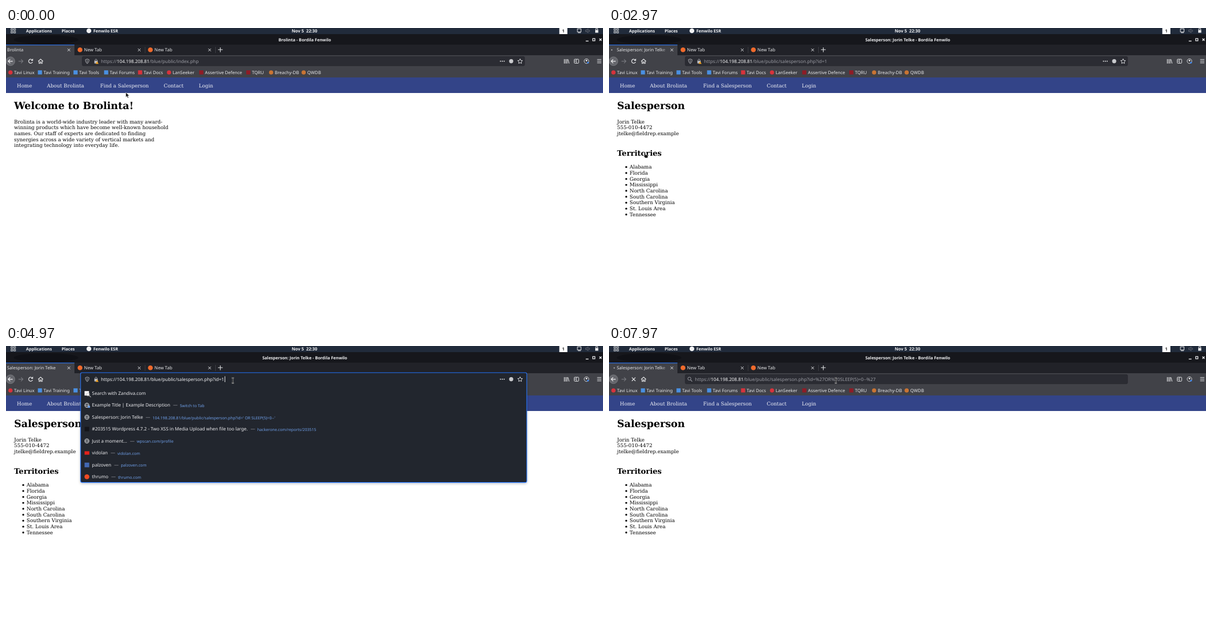
These frames come from a looping animation (1073 by 522 pixels, 8000 ms). An HTML page:

```html
<!DOCTYPE html>
<html lang="en">
<head>
<meta charset="utf-8">
<title>Browser session</title>
<style>
html, body { margin: 0; width: 100%; height: 100%; overflow: hidden; background: #fff; }
svg { display: block; }
text { text-rendering: geometricPrecision; }
.ui { font-family: "Noto Sans", sans-serif; }
.page { font-family: "DejaVu Serif", serif; font-size: 9px; }
</style>
</head>
<body>
<svg id="stage" width="1073" height="522" viewBox="0 0 1073 522"></svg>
<script>
const stage = document.getElementById('stage');
const LOOP = 8000;
const STEPS = [0, 970, 1970, 2970, 3970, 4970, 5970, 6970, 7970];

const REP = 'Jorin Telke';
const BROWSER = 'Bordila Fenwilo';
const HOST = '104.198.208.81';
const DIR = '/blue/public/';
const PERSON_URL = `https://${HOST}${DIR}salesperson.php?id=`;
const LIGHT = '#e9eaec', GREY = '#9b9ca3', BAR = '#414248', FIELD = '#2b2c33', ACCENT = '#2777ff';

// drawing helpers
const rect = (x, y, w, h, fill, more = '') =>
  `<rect x="${x}" y="${y}" width="${w}" height="${h}" fill="${fill}" ${more}/>`;
const dot = (x, y, r, fill, more = '') =>
  `<circle cx="${x}" cy="${y}" r="${r}" fill="${fill}" ${more}/>`;
const line = (d, color = LIGHT, width = 1) =>
  `<path d="${d}" fill="none" stroke="${color}" stroke-width="${width}"/>`;
const ui = (x, y, s, size = 8, fill = LIGHT, more = '') =>
  `<text class="ui" x="${x}" y="${y}" font-size="${size}" fill="${fill}" ${more}>${s}</text>`;
const serif = (x, y, s, more = '') => `<text class="page" x="${x}" y="${y}" ${more}>${s}</text>`;
const heading = (y, s, size) => serif(14.6, y, s, `style="font-size:${size}px" font-weight="700"`);
const lines = (x, y, list) => list.map((s, i) => serif(x, y + i * 10.69, s)).join('');
const span = (s, fill, more = '') => `<tspan fill="${fill}" ${more}>${s}</tspan>`;
const cross = (x, y, r = 2.4, w = 1) =>
  line(`M${x - r} ${y - r}l${2 * r} ${2 * r}M${x + r} ${y - r}l${-2 * r} ${2 * r}`, LIGHT, w);
const globe = (x, y, color = LIGHT) =>
  dot(x, y, 4, 'none', `stroke="${color}" stroke-width=".8"`) +
  line(`M${x - 4} ${y}h8M${x} ${y - 4}q-4 4 0 8q4 -4 0 -8`, color, .7);
const lens = (x, y, color = GREY) =>
  dot(x - 1, y - 1, 2.8, 'none', `stroke="${color}"`) + line(`M${x + 1} ${y + 1}l3 3`, color, 1.2);

// pointers
const arrow = (x, y) =>
  `<path d="M${x} ${y}v8.6l2 -1.9l1.5 3.2l1.5 -.7l-1.5 -3.1h2.8z" fill="#111" stroke="#fff" stroke-width=".5"/>`;
const hand = (x, y) =>
  `<path d="M${x + 2} ${y + .6}q1.2 -.8 1.6 .5v3.3l3.6 .8q1 .3 .9 1.4l-.6 3.8h-4.6l-2.7 -4q.4 -1.2 1.8 0z" fill="#111" stroke="#fff" stroke-width=".6"/>`;
const beam = (x, y) => {
  const d = `M${x - 2} ${y - 4.6}q2 0 2 1.4v6.4q0 1.4 -2 1.4M${x + 2} ${y - 4.6}q-2 0 -2 1.4v6.4q0 1.4 2 1.4`;
  return line(d, '#d8d8d8', 1.8) + line(d, '#1a1a1a', .8);
};

function desktop(title) {
  return rect(0, 0, 1073, 12, '#212b3b') + rect(0, 11, 1073, 20, '#16171c') +
    `<ellipse cx="72" cy="21" rx="58" ry="8" fill="#101116"/>` +
    [[9, 1], [14, 1], [9, 6], [14, 6]].map(([x, y]) =>
      rect(x, y, 3, 3, 'none', `stroke="${LIGHT}" stroke-width=".9"`)).join('') +
    [[36, 'Applications'], [100, 'Places'], [157, 'Fenwilo ESR']].map(([x, s]) =>
      ui(x, 8, s, 7.5, '#f2f3f5', 'font-weight="700"')).join('') +
    dot(149, 5, 4.3, '#f2f3f5') +
    ui(536.5, 8, 'Nov 5\u00a0 22:30', 7.8, '#f2f3f5', 'font-weight="700" text-anchor="middle"') +
    rect(994.5, 0, 14.5, 11, '#fff') + ui(1001.7, 8, '1', 7.5, '#222', 'font-weight="700" text-anchor="middle"') +
    rect(1027, 1.5, 6.5, 5.5, 'none', `stroke="${LIGHT}"`) + line('M1028 8.6h5') +
    line('M1042 3.5h2l2 -2v7l-2 -2h-2zM1048 3q2 2 0 4', '#696d77') +
    rect(1059, 3.5, 5.5, 5, LIGHT) + line('M1060 3.5v-2.5h3.5v2.5') +
    ui(537, 24, title, 7.5, '#f0f1f3', 'font-weight="700" text-anchor="middle"') +
    line('M1042 23.5h5', LIGHT, 1.4) + rect(1054.5, 19, 4, 4, 'none', `stroke="${LIGHT}" stroke-width="1.3"`) +
    cross(1068.5, 21, 2, 1.4);
}

function tabs(name, spin) {
  let out = rect(0, 30, 1073, 19, '#212228') + rect(0, 30, 123, 19, BAR) + rect(0, 30, 123, 1, ACCENT);
  out += ui(spin ? 14 : 2, 42, name, 7.9);
  if (spin) {
    out += `<rect x="93" y="33" width="14" height="13" fill="url(#fade)"/>` + rect(107, 33, 15, 13, BAR) +
      dot(spin, 39.5, 1.1, '#c9cacd');
  }
  out += cross(113, 39.5);
  for (const x of [133, 259.5]) {
    out += dot(x, 39.3, 4.3, '#ef6a2c') + ui(x + 7.3, 42, 'New Tab', 8) + cross(x + 106.5, 39.5);
  }
  return out + line('M250 34v11M376.5 34v11', '#4a4b52', .7) + line('M381 39h8.5M385.2 35v8.5', LIGHT, 1.1);
}

const shield = line('M146 55.8l3.3 1.2q.2 5 -3.3 7.2q-3.5 -2.2 -3.3 -7.2zM146 57.5v5', '#b9babf', .9);
const padlock = rect(158.8, 59, 6, 4.7, '#b9babf') + line('M160 59v-1.6q1.8 -3 3.6 0v1.6', '#b9babf') +
  '<path d="M163.7 60l2.8 4.6h-5.6z" fill="#f5a623"/>';
const fieldIcons = [888.7, 892, 895.3].map(x => dot(x, 59.7, 1, LIGHT)).join('') +
  dot(908, 59.7, 3.7, '#c9cacd') +
  line('M924 55.5l1.3 2.8l3 .4l-2.2 2.1l.5 3l-2.6 -1.4l-2.6 1.4l.5 -3l-2.2 -2.1l3 -.4z', LIGHT, .9);

function toolbar(path, busy) {
  let out = rect(0, 49, 1073, 40, BAR) +
    dot(8, 59.8, 8, '#66676d', 'stroke="#85868b" stroke-width=".6"') +
    line('M12 59.8h-8M7.5 56.3l-3.5 3.5l3.5 3.5', '#f4f4f5', 1.2) +
    line('M22.5 59.8h8M27 56.3l3.5 3.5l-3.5 3.5', '#77787e', 1.2) +
    line('M57.8 60l4.4 -4l4.4 4M59.3 59.5v4.3h2v-2.8h1.8v2.8h2v-4.3', LIGHT, 1.1);
  out += busy ? cross(44.3, 59.8, 3.2, 1.2)
    : line('M47.4 58a3.6 3.6 0 1 0 .3 3', LIGHT, 1.2) + `<path d="M48.5 55v4h-4z" fill="${LIGHT}"/>`;
  out += rect(137, 51.5, 795, 16.5, FIELD, 'rx="2" stroke="#24252b" stroke-width=".8"');
  out += busy ? lens(145.5, 59.8) : shield + padlock + fieldIcons;
  out += ui(busy ? 154.6 : 170.7, 63, 'https://' + span(HOST, '#f7f7f8') + DIR + path, 8.28, GREY);
  out += line('M1003.5 56v8M1006 56v8M1008.4 56v8M1010 56.3l2 7.6', LIGHT, 1.1) +
    rect(1021.3, 56.2, 8, 7.2, 'none', `rx="1" stroke="${LIGHT}"`) + line('M1025.3 56v7.5M1022.5 58.5h2M1022.5 60.5h2', LIGHT, .8) +
    dot(1043.3, 59.6, 4.2, 'none', `stroke="${LIGHT}" stroke-width=".9"`) + dot(1043.3, 58.6, 1.5, LIGHT) +
    dot(1046, 62.3, 1.6, '#3b86f0') +
    line('M1062.5 56.8h7.5M1062.5 59.8h7.5M1062.5 62.8h7.5', LIGHT, 1.1);
  return out + bookmarks();
}

function bookmarks() {
  const red = '#d8333c', blue = '#4a90e2', dark = '#8e1c26', orange = '#c97433';
  const items = [
    [8, red, 'Tavi Linux', 1], [61, blue, 'Tavi Training'], [125, blue, 'Tavi Tools'],
    [180, blue, 'Tavi Forums'], [241, red, 'Tavi Docs'], [293, red, 'LanSeeker', 1],
    [351, dark, 'Assertive Defence'], [435.5, dark, 'TQRU'], [476.5, orange, 'Breachy-DB', 1], [535, orange, 'QWDB', 1]
  ];
  return items.map(([x, c, s, round]) =>
    (round ? dot(x, 80, 3.8, c) : rect(x - 3.7, 76.2, 7.4, 7.4, c)) + ui(x + 6.6, 83, s, 7.95)).join('');
}

function nav(width) {
  const items = [[19.6, 'Home'], [73.6, 'About Brolinta'], [169.3, 'Find a Salesperson'], [283.5, 'Contact'], [346.5, 'Login']];
  return rect(0, 89, width, 28, '#334488') + items.map(([x, s]) => serif(x, 107.2, s, 'fill="#f1f2f7"')).join('');
}

const home = () => heading(146.4, 'Welcome to Brolinta!', 18) + lines(14.6, 171.7, [
  'Brolinta is a world-wide industry leader with many award-',
  'winning products which have become well-known household',
  'names. Our staff of experts are dedicated to finding',
  'synergies across a wide variety of vertical markets and',
  'integrating technology into everyday life.']);

function territories(fading) {
  const wal = 'Walter Pemlinton', ode = 'Odelie Fanrig', ros = 'Rosanna Wendrick';
  const states = [
    ['Alabama (AL)', REP], ['Alaska (AK)', wal], ['Arizona (AZ)', ode], ['Arkansas (AR)', 'Henrietta Osvan'],
    ['California (CA)', '*Northern California', wal, '*Southern California', 'Nelly Cravello'],
    ['Colorado (CO)', ode], ['Connecticut (CT)', ros], ['Delaware (DE)', ros], ['Florida (FL)', REP], ['Georgia (GA)']
  ];
  let out = heading(146.4, 'Find a Salesperson', 18) + lines(14.6, 171.7, [
    'Use the list below to find a salesperson nearby. We are ready', 'to serve you!']) +
    serif(14.6, 202.3, 'UNITED STATES', 'font-weight="700"');
  let y = 222.2;
  for (const [state, ...rows] of states) {
    out += serif(14.6, y, state);
    rows.forEach((row, i) => {
      const area = row[0] === '*';
      y += 10.69;
      if (area || i === 0) out += rect(29.3, y - 4.6, 3.4, 3.4, '#000');
      out += area ? serif(37, y, row.slice(1)) : serif(37, y, row, 'fill="#00e" text-decoration="underline"');
    });
    y += 19.7;
  }
  return out + rect(1070.5, 89, 2.5, 433, '#d4d5d8') + rect(1071, 90, 2, 83, '#5a5d65') +
    rect(0, 518, 186, 6, '#38383d', `rx="1.5" opacity="${fading ? .72 : 1}"`);
}

function person() {
  const areas = ['Alabama', 'Florida', 'Georgia', 'Mississippi', 'North Carolina', 'South Carolina',
    'Southern Virginia', 'St. Louis Area', 'Tennessee'];
  return heading(146.4, 'Salesperson', 18) +
    lines(14.6, 171.7, [REP, '555-010-4472', 'jtelke@fieldrep.example']) +
    heading(230.3, 'Territories', 13.5) + lines(37, 253.2, areas) +
    areas.map((_, i) => dot(31, 250.3 + i * 10.69, 1.7, '#000')).join('');
}

const panel = bottom => rect(134, 48, 802, bottom - 48, '#23252e',
  `rx="2.5" stroke="${ACCENT}" stroke-width="1.1" filter="url(#shadow)"`);

function suggestions() {
  const rows = [
    ['Search with Zandiva.com'], ['Example Title | Example Description', 'Switch to Tab'],
    [`Salesperson: ${REP}`, `${HOST}${DIR}salesperson.php?id=' OR SLEEP(5)=0--'`],
    ['#203515 Wordpress 4.7.2 - Two XSS in Media Upload when file too large.', 'hackerone.com/reports/203515'],
    ['Just a moment...', 'wpscan.com/profile'], ['vidolan', 'vidolan.com'], ['palzoven', 'palzoven.com'], ['thrumo', 'thrumo.com']
  ];
  const icon = (i, y) => [
    () => rect(141.2, y - 4, 8, 8, '#fff') + lens(148.5, y + 3, '#bbb'),
    () => globe(145.4, y) + rect(147, y + 1, 4, 3.5, '#6da4f2'),
    () => globe(145.4, y),
    () => rect(141.4, y - 4, 8, 8, '#14151a'),
    () => globe(145.4, y),
    () => rect(141.2, y - 3, 8.6, 6.2, '#e3211c'),
    () => rect(141.2, y - 4, 8.4, 8.4, '#4267b2'),
    () => dot(145.4, y, 4.4, '#f04a23')
  ][i]();
  return panel(245.6) + shield + padlock + fieldIcons +
    ui(170.7, 63, PERSON_URL + '1', 8.28, '#f4f4f6') + rect(393, 54.5, .9, 10.5, '#fff') +
    rows.map(([s, url], i) => {
      const y = 85.2 + i * 21.45;
      const tail = url ? span('—', GREY, 'dx="5"') + span(url, '#6f9fe8', 'dx="4" dy=".6" font-size="7.15"') : '';
      return icon(i, y) + ui(154.6, y + 2.8, s + tail, 8.28, '#ececef');
    }).join('');
}

function typed() {
  const url = PERSON_URL + "'OR SLEEP(5)=0--'";
  const gear = Array.from({ length: 8 }, (_, i) => {
    const a = i * Math.PI / 4, c = Math.cos(a), s = Math.sin(a);
    return `M${922.7 + 2 * c} ${116 + 2 * s}L${922.7 + 4.2 * c} ${116 + 4.2 * s}`;
  }).join('');
  return panel(132.8) + lens(145.5, 59.8) + ui(154.6, 63, url, 8.28, '#f4f4f6') +
    line('M919.5 59.8h8M924.5 56.5l3.3 3.3l-3.3 3.3', '#d8d9dc') +
    rect(138, 76, 793.5, 18, ACCENT) + globe(145.4, 85.2, '#fff') +
    ui(154.6, 88, span(url, '#fff', 'font-weight="700"') + span('—', '#a9caff', 'dx="5"') +
      span('Visit', '#d3e4ff', 'dx="4" dy=".4" font-size="7.15"'), 7.78) +
    ui(142, 119, 'This time, search with:', 8.28, GREY) +
    rect(242.5, 111.8, 9, 8.4, '#e9e3d8') + rect(265.4, 111.6, 8.8, 8.8, '#fff') + dot(292, 116, 4.2, '#2e7fe8') +
    dot(314.4, 116, 4.5, '#e37a35') + dot(337, 116, 4.5, '#fff') + rect(355.2, 111.6, 8.8, 8.8, '#f4f4f4') +
    line(gear, '#c9cacd', 1) + dot(922.7, 116, 2.2, 'none', 'stroke="#c9cacd"');
}

const DEFS = `<defs><linearGradient id="fade"><stop offset="0" stop-color="${BAR}" stop-opacity="0"/>
<stop offset="1" stop-color="${BAR}"/></linearGradient>
<filter id="shadow" x="-5%" y="-10%" width="110%" height="125%">
<feDropShadow dx="0" dy="1.5" stdDeviation="2" flood-opacity=".25"/></filter></defs>`;

function scene(step) {
  const at = { spin: 0, busy: false, nav: 1073, over: '' };
  if (step === 0) {
    Object.assign(at, { name: 'Brolinta', path: 'index.php', body: home(), pointer: arrow(215.3, 116) });
  } else if (step < 3) {
    Object.assign(at, { name: 'Find a Salesperson', path: 'territories.php', nav: 1070.5,
      body: territories(step === 2), pointer: step === 1 ? hand(212, 103) : arrow(120.3, 207) });
  } else {
    const busy = step > 6;
    Object.assign(at, { name: `Salesperson: ${REP}`, busy, body: person(),
      path: 'salesperson.php?id=' + (busy ? '%27OR%20SLEEP(5)=0--%27' : '1'),
      spin: step === 3 ? 5 : step === 7 ? 9.9 : step === 8 ? 9.4 : 0,
      over: step === 5 ? suggestions() : step === 6 ? typed() : '',
      pointer: step === 3 ? hand(62, 223.5) : step === 4 ? beam(413.2, 57.5) : beam(407.7, 62) });
  }
  return DEFS + rect(0, 0, 1073, 522, '#fff') + at.body + nav(at.nav) + desktop(`${at.name} - ${BROWSER}`) +
    tabs(at.name, at.spin) + toolbar(at.path, at.busy) + at.over + at.pointer;
}

let shown = -1;
function draw(now) {
  const t = now % LOOP;
  const step = STEPS.filter(s => s <= t).length - 1;
  if (step !== shown) stage.innerHTML = scene(shown = step);
}
const start = performance.now();
function tick() {
  draw(performance.now() - start);
  requestAnimationFrame(tick);
}
tick();
</script>
</body>
</html>
```
